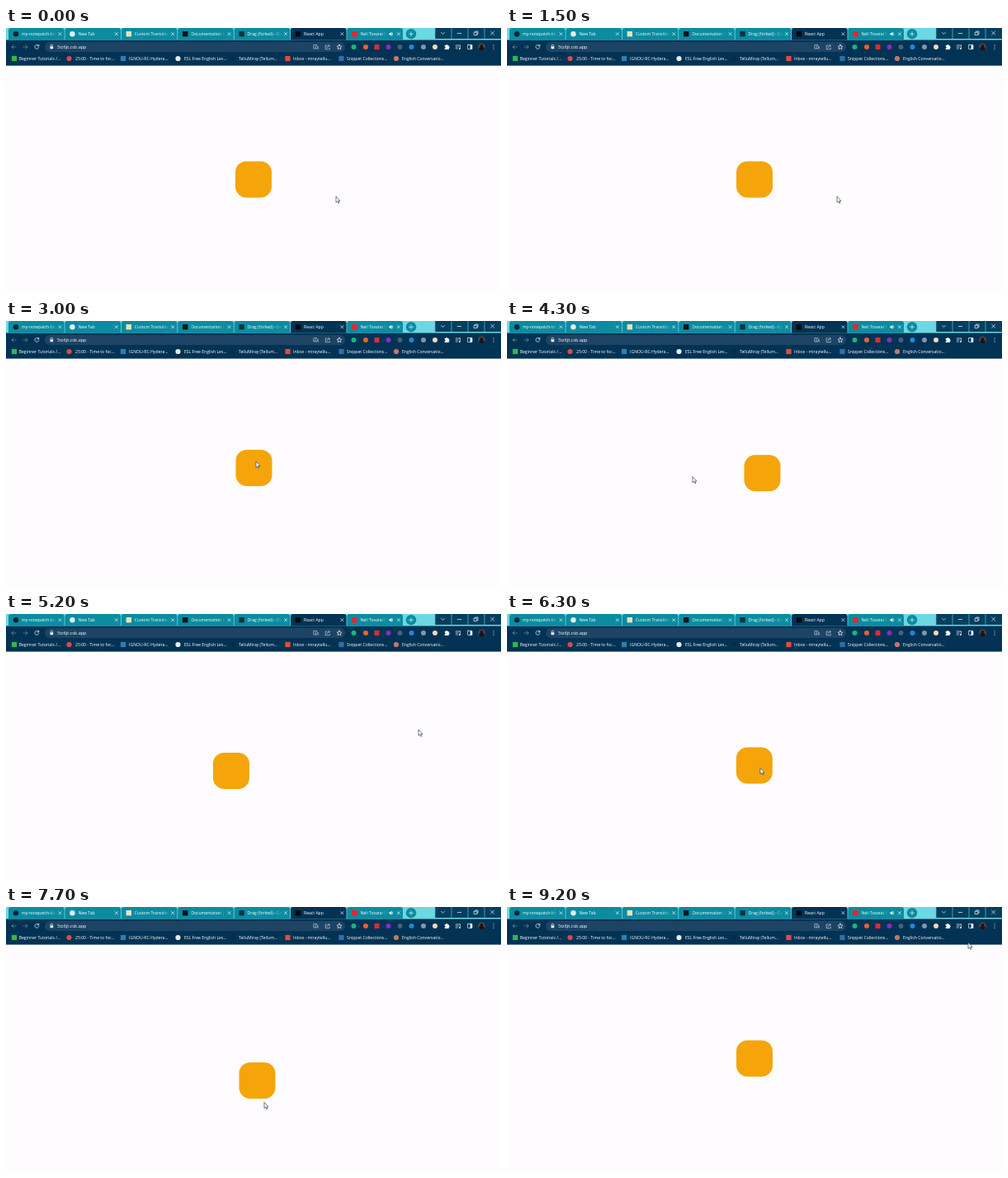
Recreate the animation shown at these times as an HTML page. Size 600 by 321 pixels, loop 9.4 s.

```html
<!DOCTYPE html>
<html lang="en">
<head>
<meta charset="utf-8">
<title>Drag demo</title>
<style>
html, body { margin: 0; width: 100%; height: 100%; overflow: hidden; background: #fefcfe; }
svg { display: block; width: 600px; height: 321px; }
text { font: 5.1px "Open Sans", "Noto Sans", sans-serif; fill: #fff; white-space: pre; }
.url { font-size: 5.5px; }
.line { fill: none; stroke: #eef5f8; stroke-width: .7; stroke-linecap: round; stroke-linejoin: round; }
.dim { opacity: .45; }
.soft { opacity: .75; }
</style>
</head>
<body>
<svg viewBox="0 0 600 321">
  <defs>
    <linearGradient id="fade">
      <stop offset=".8" stop-color="#fff"/>
      <stop offset="1" stop-color="#fff" stop-opacity="0"/>
    </linearGradient>
    <mask id="title" maskUnits="userSpaceOnUse" x="0" y="-8" width="42" height="14">
      <rect y="-8" width="42" height="14" fill="url(#fade)"/>
    </mask>
    <mask id="short" maskUnits="userSpaceOnUse" x="0" y="-8" width="32" height="14">
      <rect y="-8" width="32" height="14" fill="url(#fade)"/>
    </mask>
  </defs>

  <rect width="600" height="321" fill="#fefcfe"/>
  <rect width="600" height="15" fill="#6cd8e2"/>
  <rect y="14.5" width="600" height="31.1" fill="#033354"/>
  <g id="tabs"></g>

  <circle cx="491" cy="7.2" r="6.2" fill="#0b8ca1"/>
  <path class="line" d="M488.6 7.2h4.8M491 4.8v4.8"/>
  <rect x="520" width="80" height="13" fill="#043f5f"/>
  <path d="M520 0v13M540 0v13M560 0v13M580 0v13" stroke="#5fc4d0" stroke-width=".7"/>
  <path class="line" d="M527.5 5.4l2 2 2-2M547.3 6.5h4.4M567.5 5.2h3.4v3.4h-3.4zM568.6 5v-1h3.4v3.4h-.9M587.6 4.2l4 4M591.6 4.2l-4 4"/>

  <rect x="47" y="17" width="364" height="12" rx="6" fill="#1d4464"/>
  <g class="line">
    <path class="dim" d="M12 23H7m2.2-2.2L7 23l2.2 2.2M21 23h5m-2.2-2.2L26 23l-2.2 2.2"/>
    <path d="M39.6 21.6a2.5 2.5 0 1 0 .2 2M39.8 20.2v1.8H38"/>
    <path d="M54 22.3v-.8a1.3 1.3 0 0 1 2.6 0v.8"/>
    <g class="soft">
      <path d="M376.5 20.6h-3.6v4.4h3M377.8 24.4l1 1.1"/>
      <circle cx="376.6" cy="23.2" r="1.6"/>
      <path d="M389 21h-1.8v4.7h5.2v-1.5M389 23.9c.1-1.7 1.2-2.4 3-2.4m-1.1-1.4l1.7 1.4-1.7 1.4"/>
    </g>
    <path d="M404 20l.9 2 2.1.2-1.6 1.4.5 2.1-1.9-1.1-1.9 1.1.5-2.1-1.6-1.4 2.1-.2z"/>
    <path d="M545.2 21h5.2M545.2 23h3M545.2 25h2.2M550.4 21v4"/>
    <rect x="559.6" y="20.4" width="5.4" height="5.2" rx=".5"/>
  </g>
  <rect x="53.5" y="22.3" width="3.7" height="3" rx=".5" fill="#eef5f8"/>
  <text class="url" x="62" y="25">5tz6jt.csb.app</text>
  <path d="M531.7 21h1.5a1 1 0 0 1 2 0h1.5v1.6a1 1 0 0 1 0 2v1.5h-5v-1.6a1 1 0 0 0 0-2zM562.6 20.4h2.4v5.2h-2.4z" fill="#fff"/>
  <circle cx="549.8" cy="25.1" r=".9" fill="#fff"/>
  <circle cx="576.5" cy="23" r="4.5" fill="#514144"/>
  <path d="M573 25.8c.5-2.2 1.7-2 1.9-3.3a1.7 1.9 0 1 1 3.2 0c.2 1.3 1.5 1.1 1.9 3.3a4.5 4.5 0 0 1-7 0z" fill="#17131b"/>
  <path d="M591 20.7h.01M591 23h.01M591 25.3h.01" stroke="#fff" stroke-width="1.1" stroke-linecap="round"/>
  <g id="tools"></g>
  <g id="marks"></g>

  <rect id="box" x="278" y="161.4" width="44" height="44" rx="13.5" fill="#f5a50a"/>
  <path id="cursor" d="M0 0v7.4l1.7-1.5 1.2 2.5 1.1-.5-1.2-2.4h2.2z" fill="#fff" stroke="#33333c" stroke-width=".65" stroke-linejoin="round"/>
</svg>
<script>
const $ = id => document.getElementById(id);
const dot = (x, y, r, color) => `<circle cx="${x}" cy="${y}" r="${r}" fill="${color}"/>`;
const square = (x, y, r, color) =>
  `<rect x="${x - r}" y="${y - r}" width="${2 * r}" height="${2 * r}" fill="${color}"/>`;

const tabs = [
  ['my-notepatch-blog', dot, '#0b2734'],
  ['New Tab', dot, '#e2eef0'],
  ['Custom Transition', square, '#e5e3bd'],
  ['Documentation | F', square, '#06141b'],
  ['Drag (forked) - Co', square, '#0b3443'],
  ['React App', square, '#080b10'],
  ['Neli Tovarai S', square, '#e8252b']
];
$('tabs').innerHTML = tabs.map(([name, icon, color], i) => {
  const x = 3 + i * 68.4, active = i === 5, audio = i === 6;
  return `<path d="M${x} 14.6V3q0-3 3-3h61.6q3 0 3 3v11.6z" fill="${active ? '#033354' : '#0b8ca1'}"/>` +
    icon(x + 9, 7.2, 3.2, color) +
    `<g transform="translate(${x + 16} 9.2)" mask="url(#${audio ? 'short' : 'title'})"><text>${name}</text></g>` +
    (audio ? `<path d="M${x + 51} 6.2h1.3l1.7-1.5v5l-1.7-1.5h-1.3z" fill="#fff"/>
      <path class="line" d="M${x + 55} 5.8q1 1.4 0 2.8"/>` : '') +
    `<path class="line" d="M${x + 60.8} 5.6l3.2 3.2m0-3.2l-3.2 3.2"/>`;
}).join('');

const tools = [
  [421.5, dot, '#18b77c'], [436, dot, '#e8622d'], [449.5, square, '#d92d34'],
  [463.5, dot, '#8a2bc4'], [477.5, dot, '#46617a'], [491.5, dot, '#2688d8'],
  [506, dot, '#8496a5'], [520, dot, '#ead8bd']
];
$('tools').innerHTML = tools.map(([x, icon, color]) => icon(x, 23, 3, color)).join('');

const marks = [
  [10, 15.7, 'Beginner Tutorials /...', square, '#35b54a'],
  [76.5, 84, '25:00 - Time to foc...', dot, '#d94a4c'],
  [142, 149, 'IGNOU-RC-Hydera...', square, '#2d7fb3'],
  [208.5, 216, 'ESL Free English Les...', dot, '#e5edf1'],
  [275, 282, 'TelluMiray (Tellum...', dot, '#062c49'],
  [341.5, 348, 'Inbox - miraytellu...', square, '#e34b3f'],
  [406.5, 413, 'Snippet Collections...', square, '#2f6fa8'],
  [473, 480, 'English Conversatio...', dot, '#c9756b']
];
$('marks').innerHTML = marks.map(([ix, x, name, icon, color]) =>
  icon(ix, 37, 3.1, color) + `<text x="${x}" y="38.9">${name}</text>`).join('');

// Pointer path: time, x, y
const path = [
  [1500, 400, 204], [2300, 302, 181], [2500, 302, 181], [2700, 302, 240],
  [3000, 303, 170], [3200, 306, 142], [3500, 300, 178], [3700, 236, 182],
  [3900, 352, 180], [4200, 224, 173], [4300, 225, 188.5], [4500, 209, 191],
  [4800, 300, 186], [5100, 450, 150], [5200, 500, 140], [5400, 466, 200],
  [5600, 430, 243], [6300, 307, 186.5], [6400, 304, 183], [6700, 303, 136],
  [7200, 309, 280], [7500, 308, 125], [7700, 313, 236.5], [7900, 318, 310],
  [8400, 460, 192], [9200, 559, 43]
];
const drags = [[2500, 4210], [4800, 5100], [6400, 7950]];
const LOOP = 9400, STEP = 100, ELASTIC = .5, STIFFNESS = 600, DAMPING = 10;

function pointer(t) {
  const i = path.findIndex(p => p[0] > t);
  if (i === 0) return path[0].slice(1);
  if (i < 0) return path[path.length - 1].slice(1);
  const [t0, x0, y0] = path[i - 1], [t1, x1, y1] = path[i];
  const u = (t - t0) / (t1 - t0), e = u * u * (3 - 2 * u);
  return [x0 + (x1 - x0) * e, y0 + (y1 - y0) * e];
}

function spring(ms) {
  const s = ms / 1000, k = DAMPING / 2, w = Math.sqrt(STIFFNESS - k * k);
  return Math.exp(-k * s) * (Math.cos(w * s) + k / w * Math.sin(w * s));
}

function offset(t) {
  const drag = drags.filter(d => d[0] <= t).pop();
  if (!drag) return [0, 0];
  const [grab, release] = drag;
  const from = pointer(grab), to = pointer(Math.min(t, release));
  const pull = ELASTIC * (t > release ? spring(t - release) : 1);
  return to.map((v, i) => (v - from[i]) * pull);
}

const place = (id, [x, y]) => $(id).setAttribute('transform', `translate(${x.toFixed(2)} ${y.toFixed(2)})`);

function draw() {
  const t = Math.floor(performance.now() % LOOP / STEP) * STEP;
  place('box', offset(t));
  place('cursor', pointer(t));
  requestAnimationFrame(draw);
}
draw();
</script>
</body>
</html>
```
